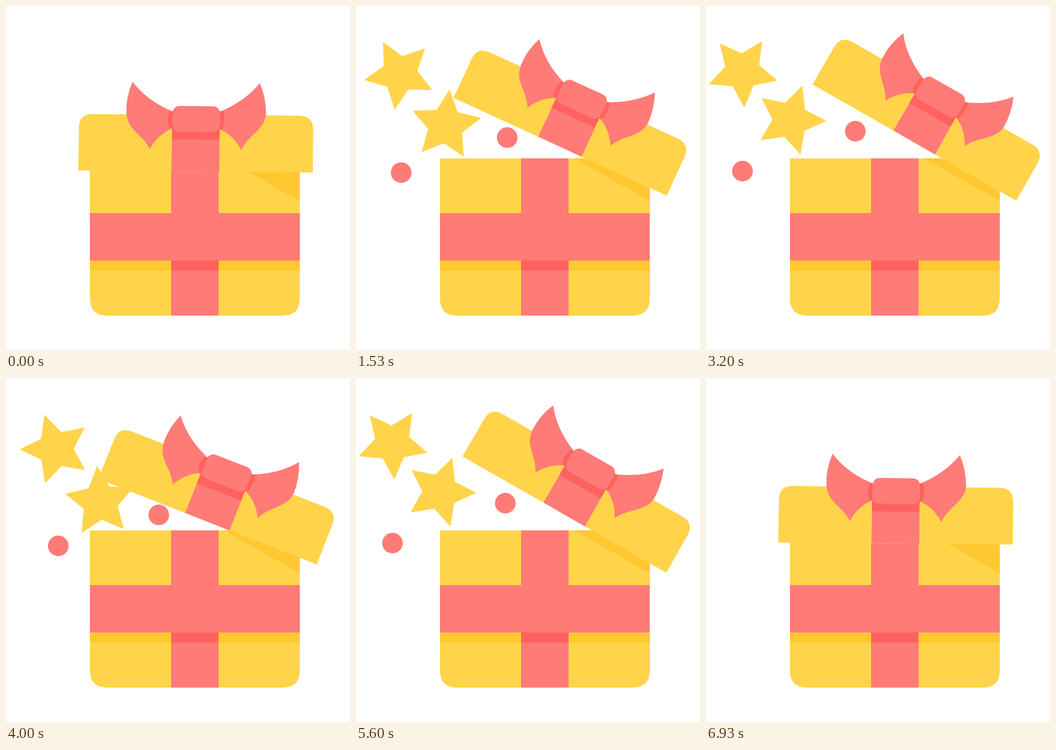
Recreate the animation shown at these times as an HTML page. Size 500 by 500 pixels, loop 7.16 s.

```html
<!DOCTYPE html>
<html>
<head>
<meta charset="utf-8">
<style>
html, body { margin: 0; width: 100%; height: 100%; overflow: hidden; background: #fff; }
svg { display: block; width: 100%; height: 100%; }
.yellow { fill: #ffd44a; }
.amber { fill: #ffc831; }
.pink { fill: #ff7b77; }
.red { fill: #ff6260; }
</style>
</head>
<body>
<svg viewBox="0 0 500 500">
  <g id="confetti">
    <polygon class="yellow"/>
    <polygon class="yellow"/>
    <circle class="pink" r="15"/>
    <circle class="pink" r="15"/>
  </g>
  <g id="box">
    <path class="yellow" d="M122 221.500H427V425Q427 450 402 450H147Q122 450 122 425Z"/>
    <path class="amber" d="M122 370H427V384.500H122ZM317 221.500H427V284Z"/>
    <path class="pink" d="M240 221.500H309V450H240ZM122 301H427V370H122Z"/>
    <path class="red" d="M240 370H309V384.500H240Z"/>
  </g>
  <g id="lid">
    <path class="yellow" d="M105 239L106 177Q106 157 126 157L427 159.500Q446.500 160 446.500 180L446 242Z"/>
    <path class="pink" d="M241.500 170L310.500 170.500L310 241L240.500 240Z"/>
    <path class="red" d="M241.500 180H310.500L310 194.500L241 194Z"/>
    <path class="pink" d="M184 110Q205 138 242 153V178Q221 186 209 208C199 186 176 181 175 155Q174 133 184 110Z"/>
    <path class="pink" d="M369 112Q347 139 310 154V179Q330 187 342 209.500C352 187 377 180 378 156Q378 134 369 112Z"/>
    <path class="red" d="M246 152L238 154Q232 166 237 177L246 180ZM307 153L316 153Q319 167 315 178L307 181Z"/>
    <rect class="pink" x="242" y="145.500" width="69" height="37.500" rx="10" transform="rotate(.5 276 164)"/>
  </g>
</svg>
<script>
const LOOP = 7160, CYCLE = 2400;
const lid = document.getElementById('lid');
const pieces = [...document.getElementById('confetti').children];

// Hidden position, outer position, bend of the path, final angle, spin
const flights = [
  { from: [238, 250], to: [53, 95], bend: 1.3, angle: 15, spin: 195 },
  { from: [261, 303], to: [122.4, 165.6], bend: 1, angle: 1.5, spin: -233 },
  { from: [272, 278], to: [53, 240], bend: 1, angle: 0, spin: 0 },
  { from: [265, 344], to: [217, 182], bend: 1, angle: 0, spin: 0 }
];

const star = Array.from({ length: 10 }, (_, i) => {
  const a = i * Math.PI / 5, r = i % 2 ? 26 : 52.5;
  return `${r * Math.cos(a)},${r * Math.sin(a)}`;
}).join(' ');
pieces.slice(0, 2).forEach(p => p.setAttribute('points', star));

const clamp = x => Math.min(1, Math.max(0, x));

// The motion advances at 15 steps per second, with short rests in the first cycle
function stepAt(t) {
  if (t >= CYCLE) return Math.floor(((t % CYCLE) + 5) * 15 / 1000);
  const u = t % 800;
  return 12 * Math.floor(t / 800) + (u < 100 ? 0 : 1 + Math.floor((u - 100) / 61.4));
}

function draw(t) {
  const k = stepAt(t);
  const closed = k < 12 ? 1 - k / 12 : clamp((k - 19.8) / 11.7);
  const sway = Math.sin(Math.PI * clamp((k - 12) / 8));
  const open = (1 + Math.cos(Math.PI * closed)) / 2;
  lid.setAttribute('transform', `rotate(${29.2 * open + sway} 370 272)`);

  const back = closed ** 2.2;
  flights.forEach(({ from, to, bend, angle, spin }, i) => {
    const x = to[0] + (from[0] - to[0]) * back;
    const y = to[1] + (from[1] - to[1]) * back ** bend;
    const turn = angle + spin * back - Math.sign(spin) * 3 * sway;
    pieces[i].setAttribute('transform', `translate(${x} ${y}) rotate(${turn})`);
  });
}

function tick(now) {
  draw(now % LOOP);
  requestAnimationFrame(tick);
}
draw(0);
requestAnimationFrame(tick);
</script>
</body>
</html>
```
